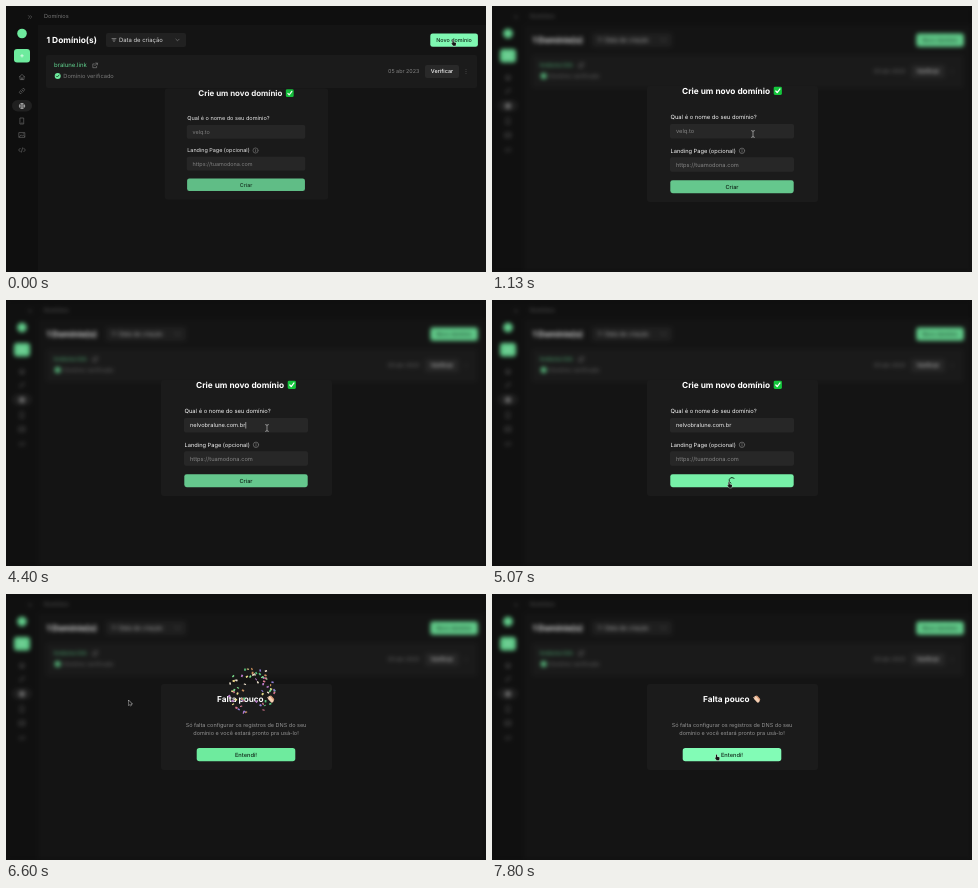
Recreate the animation shown at these times as an HTML page with a canvas. Size 480x266 px, loop 8 s.

```html
<!DOCTYPE html>
<html lang="pt-BR">
<head>
<meta charset="utf-8">
<title>Novo domínio</title>
<style>
  html, body { margin: 0; width: 100%; height: 100%; overflow: hidden; background: #101010; }
  canvas { display: block; width: 100vw; height: 100vh; }
</style>
</head>
<body>
<canvas id="stage"></canvas>
<script>
const W = 480, H = 266, LOOP = 8000;
const GREEN = '#6eeb9e', HOVER = '#7ff8b2', INK = '#10281a';
const DOMAIN = 'nelvobralune.com.br';
const ratio = window.devicePixelRatio || 1;

function makeCanvas(el) {
  el.width = W * ratio;
  el.height = H * ratio;
  const c = el.getContext('2d');
  c.scale(ratio, ratio);
  c.textRendering = 'geometricPrecision';
  c.lineCap = c.lineJoin = 'round';
  return c;
}

const view = makeCanvas(document.getElementById('stage'));
const page = makeCanvas(document.createElement('canvas'));

const clamp = v => Math.max(0, Math.min(1, v));
const span = (t, a, b) => clamp((t - a) / (b - a));
const smooth = u => u * u * (3 - 2 * u);
const mix = (a, b, u) => a + (b - a) * u;

// y is the optical middle of the capitals
function text(c, str, x, y, size, color, weight = 400, align = 'left') {
  c.font = `${weight} ${size}px Inter, "Open Sans", sans-serif`;
  c.textAlign = align;
  c.fillStyle = color;
  c.fillText(str, x, y + size * 0.36);
}

function box(c, x, y, w, h, r, color) {
  c.fillStyle = color;
  c.beginPath();
  c.roundRect(x, y, w, h, r);
  c.fill();
}

function dot(c, x, y, r, color) {
  c.fillStyle = color;
  c.beginPath();
  c.arc(x, y, r, 0, 7);
  c.fill();
}

function stroke(c, d, x, y, color, width = 0.7) {
  c.save();
  c.translate(x, y);
  c.strokeStyle = color;
  c.lineWidth = width;
  c.stroke(new Path2D(d));
  c.restore();
}

const RING = 'M2.7 0A2.7 2.7 0 1 1 -2.7 0A2.7 2.7 0 1 1 2.7 0';
const CHECK = 'M-1.3 .1L-.4 1L1.4 -1';
const MENU = [
  [71, 'M-2.8 0L0 -2.6L2.8 0M-2 -.6V2.6H2V-.6M-.6 2.6V.8H.6V2.6'],
  [85, 'M-.8 .8L.8 -.8M-.2 -1.4L.8 -2.4Q2 -3 2.6 -1.8Q2.8 -1 2 -.2L1.3 .4M.2 1.4L-.8 2.4Q-2 3 -2.6 1.8Q-2.8 1 -2 .2L-1.3 -.4'],
  [100, RING + 'M-2.7 0H2.7M0 -2.7Q-2.4 0 0 2.7Q2.4 0 0 -2.7'],
  [115, 'M-1.7 -3H1.7V3H-1.7ZM-.3 2H.3'],
  [129, 'M-2.8 -2.4H2.8V2.4H-2.8ZM-2.6 1.8L-.8 -.2L.4 1L1.4 .2L2.7 1.6M1.2 -1.2H1.4'],
  [144, 'M-1.8 -1.7L-3.4 0L-1.8 1.7M1.8 -1.7L3.4 0L1.8 1.7M.6 -2.2L-.6 2.2']
];

function drawPage(hover) {
  const c = page;
  box(c, 0, 0, W, H, 0, '#0f0f0f');
  box(c, 32, 19, W - 32, H - 19, 0, '#141414');

  stroke(c, 'M-1.6 -1.4L-.2 0L-1.6 1.4M.4 -1.4L1.8 0L.4 1.4', 24, 11, '#666', 0.6);
  text(c, 'Domínios', 38, 10, 5.6, '#747474');
  dot(c, 16, 27.5, 4.8, GREEN);
  box(c, 8, 43, 16, 13.6, 3, GREEN);
  stroke(c, 'M-1.3 0H1.3M0 -1.3V1.3', 16, 49.8, '#f2fff7', 0.7);
  box(c, 6, 94, 20, 11.5, 5.7, '#202020');
  for (const [y, d] of MENU) stroke(c, d, 16, y, y === 100 ? '#c4c4c4' : '#707070', 0.6);

  text(c, '1 Domínio(s)', 40.5, 33.5, 8.4, '#fff', 700);
  box(c, 100, 27, 80, 14, 2, '#212121');
  stroke(c, 'M-2 -1.4H2M-1.1 0H1.1M-.3 1.4H.3', 108, 34, '#999', 0.7);
  text(c, 'Data de criação', 113, 34, 5.9, '#d4d4d4');
  stroke(c, 'M-1.6 -.8L0 .8L1.6 -.8', 171.5, 34, '#888', 0.6);
  box(c, 424.3, 27.4, 47.6, 13.4, 2.4, hover ? HOVER : GREEN);
  text(c, 'Novo domínio', 448, 34, 5.4, INK, 500, 'center');

  box(c, 40, 49, 431, 33, 2, '#1b1b1b');
  text(c, 'bralune.link', 48, 59.3, 6, '#62d690');
  stroke(c, 'M-.6 -1.6H-2.2V2.2H1.6V.8M.6 -2.4H2.4V-.6M2.4 -2.4L-.2 .2', 89, 59.5, '#8c8c8c', 0.6);
  dot(c, 51.7, 70, 3, GREEN);
  stroke(c, CHECK, 51.7, 70, '#16301f', 0.8);
  text(c, 'Domínio verificado', 57.3, 70, 5.7, '#7a7a7a');
  text(c, '05 abr 2023', 382, 65.5, 5.4, '#858585');
  box(c, 419, 59, 34, 13, 2, '#292929');
  text(c, 'Verificar', 436, 65.5, 5.5, '#f4f4f4', 500, 'center');
  for (let i = -1; i < 2; i++) dot(c, 460, 65.5 + i * 2, 0.45, '#666');
}

function withModal(alpha, scale, cy, draw) {
  if (alpha <= 0) return;
  view.save();
  view.globalAlpha = alpha;
  view.translate(240.5, cy);
  view.scale(scale, scale);
  view.translate(-240.5, -cy);
  draw();
  view.restore();
}

function field(y, value, hint) {
  box(view, 178, y, 124, 14.5, 2, '#272727');
  text(view, value || hint, 184, y + 7.2, 5.7, value ? '#ececec' : '#848484');
}

// Moments at which characters appear; the last two come together
const KEYS = [2200, 2270, 2330, 2400, 2470, 2600, 2670, 2800, 2930, 3000,
  3070, 3130, 3330, 3470, 3530, 3600, 3800, 3930, 3930];
const CLICK = 4930;

function drawForm(t, pos) {
  const c = view;
  const typed = DOMAIN.slice(0, KEYS.filter(k => t >= k).length);
  box(c, 155, 80, 171, 116, 3, '#1b1b1b');
  text(c, 'Crie um novo domínio', 190, 84.7, 8.3, '#fff', 700);
  box(c, 281.7, 80.7, 8.2, 8.2, 1.4, '#14c63c');
  stroke(c, 'M-2 .2L-.6 1.8L2.2 -1.9', 285.8, 84.8, '#fff', 1.2);

  text(c, 'Qual é o nome do seu domínio?', 178.5, 111.3, 5.8, '#f4f4f4');
  field(118, typed, 'velq.to');
  if (t >= 1870 && t < 4430) {
    const w = typed ? c.measureText(typed).width : 0;
    box(c, 184.2 + w, 122, 0.6, 6.6, 0, '#ddd');
  }
  text(c, 'Landing Page (opcional)', 178.5, 144.6, 5.7, '#f4f4f4');
  stroke(c, RING + 'M0 -.2V1.3M0 -1.3V-1.2', 250, 144.8, '#888', 0.6);
  field(151.3, '', 'https://tuamodona.com');

  const over = inside(pos, 178, 174, 124, 13);
  const color = over && t > 4000 ? '#77f0a8' : t > CLICK ? GREEN : '#65c78d';
  box(c, 178.3, 174.2, 123.4, 13, 2.4, color);
  if (t < CLICK) {
    text(c, 'Criar', 240, 180.5, 5.6, INK, 500, 'center');
  } else {
    const a = (t - CLICK) / 450 * 2 * Math.PI;
    c.strokeStyle = '#173622';
    c.lineWidth = 1;
    c.beginPath();
    c.arc(240, 180.5, 2.9, a, a + 3.6);
    c.stroke();
  }
}

function drawClap(x, y) {
  const c = view;
  c.save();
  c.translate(x, y);
  c.rotate(-0.7);
  c.scale(0.88, 0.88);
  box(c, -1.2, -3.4, 3.8, 7, 1.7, '#d99b76');
  box(c, -2.6, -2.6, 3.6, 7, 1.7, '#f6d0b4');
  for (let i = 0; i < 3; i++) box(c, -2.5 + i * 1.15, -4, 1, 3.4, 0.5, '#f6d0b4');
  c.restore();
}

function drawDone(pos) {
  const c = view;
  box(c, 155, 90, 171, 86, 3, '#1b1b1b');
  text(c, 'Falta pouco', 211, 104.8, 8.2, '#fff', 700);
  drawClap(265, 104.8);
  text(c, 'Só falta configurar os registros de DNS do seu', 240, 131.3, 5.5, '#929292', 400, 'center');
  text(c, 'domínio e você estará pronto pra usá-lo!', 240, 139.4, 5.5, '#929292', 400, 'center');
  box(c, 190.7, 154, 98.6, 13.2, 2.7, inside(pos, 190, 154, 99, 13) ? '#82fcb6' : GREEN);
  text(c, 'Entendi!', 240, 160.6, 5.7, INK, 500, 'center');
}

let seed = 11;
const rnd = () => (seed = seed * 16807 % 2147483647) / 2147483647;
const TINTS = ['#7de08f', '#b678c8', '#e8dc8c', '#d9788f', '#58c47c', '#efe4d0', '#8f7fd6', '#c98f5c'];
const confetti = Array.from({ length: 68 }, (_, i) => ({
  angle: rnd() * 2 * Math.PI,
  reach: 62 * Math.sqrt(0.15 + 0.85 * rnd()),
  turn: rnd() * 6.3,
  spin: 4 + rnd() * 6,
  tint: TINTS[i % TINTS.length]
}));

function drawConfetti(t) {
  const s = (t - 6530) / 1000;
  if (t < 6590 || s > 1) return;
  const cx = 247 - 8 * s, cy = 108 - 169 * s + 180 * s * s;
  const grow = 1 - Math.exp(-7 * s);
  view.save();
  view.globalAlpha = clamp((1 - s) / 0.25);
  for (const p of confetti) {
    const r = p.reach * grow, phase = p.turn + p.spin * s;
    view.save();
    view.translate(cx + r * Math.cos(p.angle), cy + r * Math.sin(p.angle));
    view.rotate(phase);
    const h = 0.9 + 0.9 * Math.abs(Math.cos(phase * 1.7));
    box(view, -1.15, -h / 2, 2.3, h, 0.2, p.tint);
    view.restore();
  }
  view.restore();
}

// Pointer stops: time, x, y
const STOPS = [
  [0, 447, 34], [90, 447, 34], [870, 261, 131], [1000, 261, 131], [1130, 261, 128],
  [4400, 261, 128], [4870, 237, 182], [5270, 237, 182], [6040, 122.5, 106.5],
  [7100, 122.5, 106.5], [7660, 224.5, 160.5], [LOOP, 224.5, 160.5]
];

function pointerAt(t) {
  const i = STOPS.findIndex((s, n) => n > 0 && t <= s[0]);
  const [t0, x0, y0] = STOPS[i - 1], [t1, x1, y1] = STOPS[i];
  const u = smooth(span(t, t0, t1));
  return { x: mix(x0, x1, u), y: mix(y0, y1, u) };
}

const inside = (p, x, y, w, h) => p.x >= x && p.x <= x + w && p.y >= y && p.y <= y + h;

const ARROW = new Path2D('M0 0V5.4L1.3 4.3L2.1 6.1L3 5.7L2.2 4H3.9Z');
const HAND = new Path2D('M-.6 .7Q-.6 0 0 0T.6 .7V2.6L2.9 3.1Q3.5 3.3 3.4 4L3 6.6H.2L-1.7 4.1Q-1.8 3.4 -1.1 3.5L-.6 4Z');
const BEAM = 'M-1.4 -3.4Q0 -3.4 0 -2.6Q0 -3.4 1.4 -3.4M0 -2.6V2.6M-1.4 3.4Q0 3.4 0 2.6Q0 3.4 1.4 3.4';

function drawPointer(t, p) {
  const firstForm = t < 6130;
  const onInput = firstForm && (inside(p, 178, 118, 124, 14.5) || inside(p, 178, 151, 124, 15));
  if (onInput) {
    if (t < 2200 || t >= 4400) stroke(view, BEAM, p.x, p.y, '#d0d0d0', 0.6);
    return;
  }
  const onButton = t < 200 || (firstForm ? inside(p, 178, 174, 124, 13) : inside(p, 190, 154, 99, 13));
  const shape = onButton ? HAND : ARROW;
  view.save();
  view.translate(p.x, p.y);
  view.scale(0.88, 0.88);
  view.strokeStyle = '#d4d4d4';
  view.lineWidth = 0.9;
  view.stroke(shape);
  view.fillStyle = '#151515';
  view.fill(shape);
  view.restore();
}

function render(t) {
  const pos = pointerAt(t);
  const open = smooth(span(t, 70, 330));

  drawPage(t < 200);
  view.fillStyle = '#0f0f0f';
  view.fillRect(0, 0, W, H);
  view.filter = open > 0 ? `blur(${2 * open * ratio}px)` : 'none';
  view.drawImage(page.canvas, 0, 0, W, H);
  view.filter = 'none';
  view.fillStyle = `rgba(20,20,20,${0.15 * open})`;
  view.fillRect(0, 0, W, H);

  const formAlpha = mix(0.95, 1, open) * (1 - span(t, 6110, 6230));
  withModal(formAlpha, mix(0.955, 1, open), 138, () => drawForm(t, pos));
  const done = smooth(span(t, 6130, 6270));
  withModal(done, mix(0.95, 1, done), 133, () => drawDone(pos));
  drawConfetti(t);
  drawPointer(t, pos);
}

const start = performance.now();
function tick() {
  render((performance.now() - start) % LOOP);
  requestAnimationFrame(tick);
}
tick();
</script>
</body>
</html>
```
